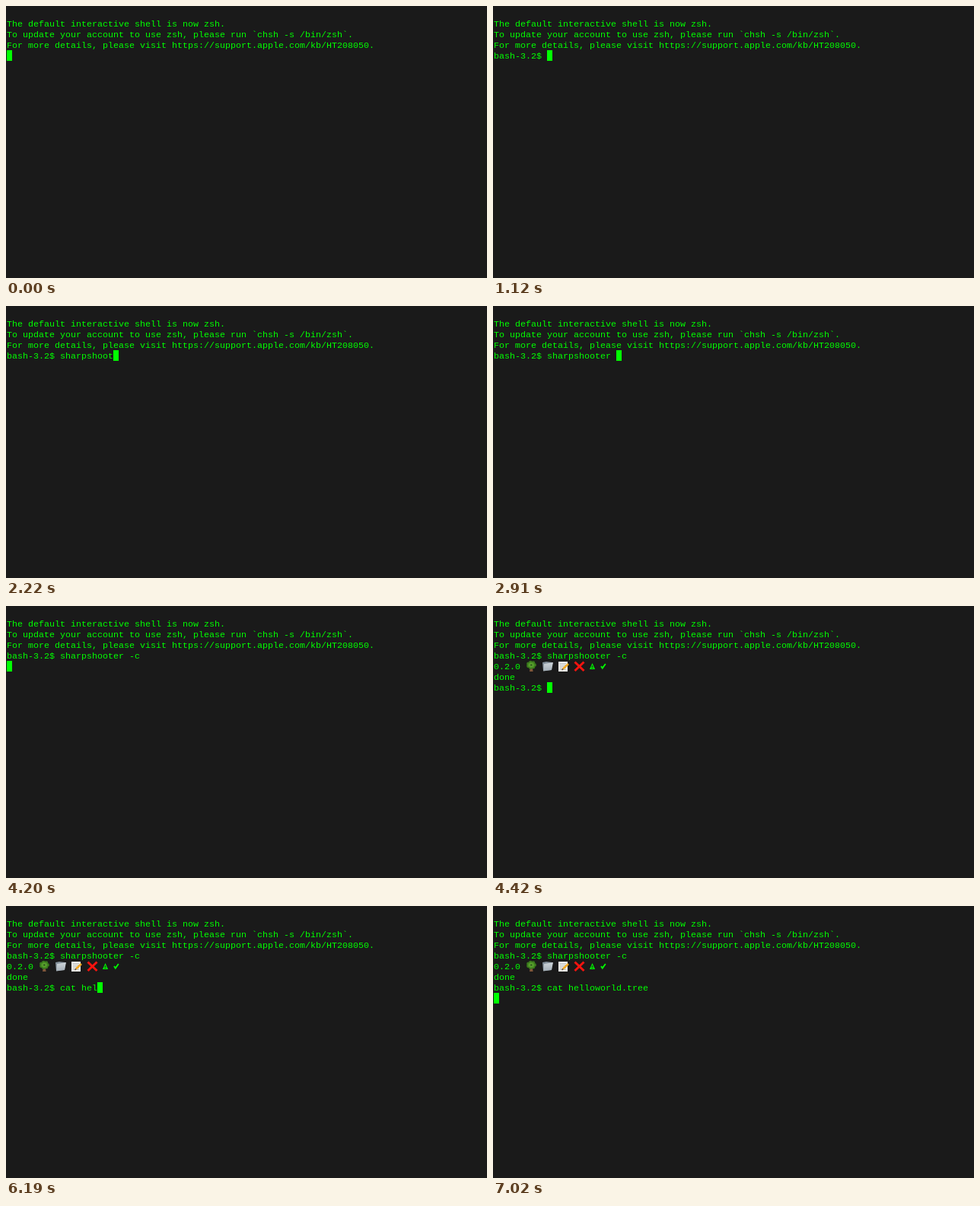
An HTML page with a canvas for the animation above (8 s loop, 632x357 px).

```html
<!DOCTYPE html>
<html lang="en">
<head>
<meta charset="utf-8">
<title>Terminal</title>
<style>
  html, body { margin: 0; width: 100%; height: 100%; overflow: hidden; background: #1a1a1a; }
  canvas { display: block; width: 632px; height: 357px; }
</style>
</head>
<body>
<canvas id="stage" width="632" height="357"></canvas>
<script>
const ctx = document.getElementById('stage').getContext('2d');
const LOOP = 8000, CELL = 7, LINE = 14, LEFT = 1, TOP = 2;
const GREEN = '#00ff00', BACK = '#1a1a1a';
const FONT = `${CELL / 0.6}px "Liberation Mono", monospace`;
const PROMPT = 'bash-3.2$ ';

const INTRO = [
  '',
  'The default interactive shell is now zsh.',
  'To update your account to use zsh, please run `chsh -s /bin/zsh`.',
  'For more details, please visit https://support.apple.com/kb/HT208050.'
];

// Bursts are typed evenly, first key at `from` and last key at `to`.
const COMMANDS = [
  { row: 4, start: 1120, enter: 4200, bursts: [
    { text: 'sharp', from: 1280, to: 1570 },
    { text: 'shooter', from: 1780, to: 2430 },
    { text: ' -c', from: 2910, to: 3250 }
  ] },
  { row: 7, start: 4420, enter: 7020, bursts: [
    { text: 'cat ', from: 5010, to: 5350 },
    { text: 'hel', from: 5980, to: 6190 },
    { text: 'loworld.tree ', from: 6330, to: 6330 }
  ] }
];
const OUTPUT = [
  { text: '0.2.0', row: 5, at: 4300, icons: true },
  { text: 'done', row: 6, at: 4360 }
];

const cellX = col => LEFT + col * CELL;
const rowY = row => TOP + row * LINE;

function write(text, row) {
  ctx.fillStyle = GREEN;
  ctx.font = FONT;
  [...text].forEach((ch, col) => ctx.fillText(ch, cellX(col), rowY(row) + 11));
}

function typed({ text, from, to }, t) {
  if (t < from) return '';
  if (t >= to) return text;
  return text.slice(0, 1 + Math.floor((t - from) / (to - from) * (text.length - 1)));
}

function path(points) {
  ctx.beginPath();
  points.forEach(([x, y]) => ctx.lineTo(x, y));
}

function poly(color, points) {
  path(points);
  ctx.fillStyle = color;
  ctx.fill();
}

function stroke(color, width, points) {
  path(points);
  ctx.strokeStyle = color;
  ctx.lineWidth = width;
  ctx.stroke();
}

function ring(color, radius, size) {
  ctx.fillStyle = color;
  for (let i = 0; i < 7; i++) {
    const a = i / 7 * Math.PI * 2;
    ctx.beginPath();
    ctx.arc(7.3 + radius * Math.cos(a), 5.4 + radius * 0.8 * Math.sin(a), size, 0, Math.PI * 2);
    ctx.fill();
  }
}

function tree() {
  poly('#80573a', [[6, 8], [8.6, 8], [9.6, 14], [5, 14]]);
  ring('#3a7a1c', 4.2, 2.4);
  ring('#549a2b', 2.6, 1.6);
}

function folder() {
  const face = ctx.createLinearGradient(0, 2, 0, 13);
  face.addColorStop(0, '#cfd6da');
  face.addColorStop(1, '#a5b0b8');
  poly('#84919b', [[1, 2], [6, 1], [14, 2], [13, 12], [2, 13]]);
  poly(face, [[3, 4], [15, 2], [13, 12], [2, 13.5]]);
}

function memo() {
  poly('#eeeeea', [[1, 1], [13, 1], [13, 14], [1, 14]]);
  for (let y = 3.5; y < 13; y += 2) stroke('#aeb2b5', 0.7, [[2.5, y], [11, y]]);
  stroke('#f3a923', 2.6, [[14, 4], [7, 10.5]]);
  stroke('#5c4637', 1.6, [[7, 10.5], [5.5, 12]]);
}

function cross() {
  stroke('#f5140f', 3, [[1.5, 1.5], [13.5, 13]]);
  stroke('#f5140f', 3, [[13.5, 1.5], [1.5, 13]]);
}

function triangle() {
  poly(GREEN, [[3.5, 3], [7, 11], [0, 11]]);
  poly(BACK, [[3.5, 5.5], [4.6, 8], [2.4, 8]]);
  stroke(BACK, 0.8, [[2, 9.4], [5, 9.4]]);
}

function check() {
  stroke(GREEN, 1.8, [[1, 7], [2.8, 9.6], [6.8, 4]]);
}

function drawIcons(row) {
  [tree, folder, memo, cross, triangle, check].forEach((draw, i) => {
    const col = i < 5 ? 6 + i * 3 : 20;
    ctx.save();
    ctx.translate(cellX(col), rowY(row));
    draw();
    ctx.restore();
  });
}

function render(t) {
  ctx.fillStyle = BACK;
  ctx.fillRect(0, 0, 632, 357);
  INTRO.forEach(write);

  let col = 0, row = INTRO.length;
  const moveTo = (c, r) => { if (r >= row) [col, row] = [c, r]; };

  for (const cmd of COMMANDS) {
    if (t < cmd.start) break;
    const line = PROMPT + cmd.bursts.map(b => typed(b, t)).join('');
    write(line, cmd.row);
    if (t < cmd.enter) moveTo(line.length, cmd.row);
    else moveTo(0, cmd.row + 1);
  }
  for (const out of OUTPUT) {
    if (t < out.at) break;
    write(out.text, out.row);
    if (out.icons) drawIcons(out.row);
    if (out.row >= row) moveTo(0, out.row + 1);
  }

  ctx.fillStyle = GREEN;
  ctx.fillRect(cellX(col), rowY(row), CELL, LINE);
}

const origin = performance.now();
function tick() {
  render((performance.now() - origin) % LOOP);
  requestAnimationFrame(tick);
}
tick();
</script>
</body>
</html>
```
